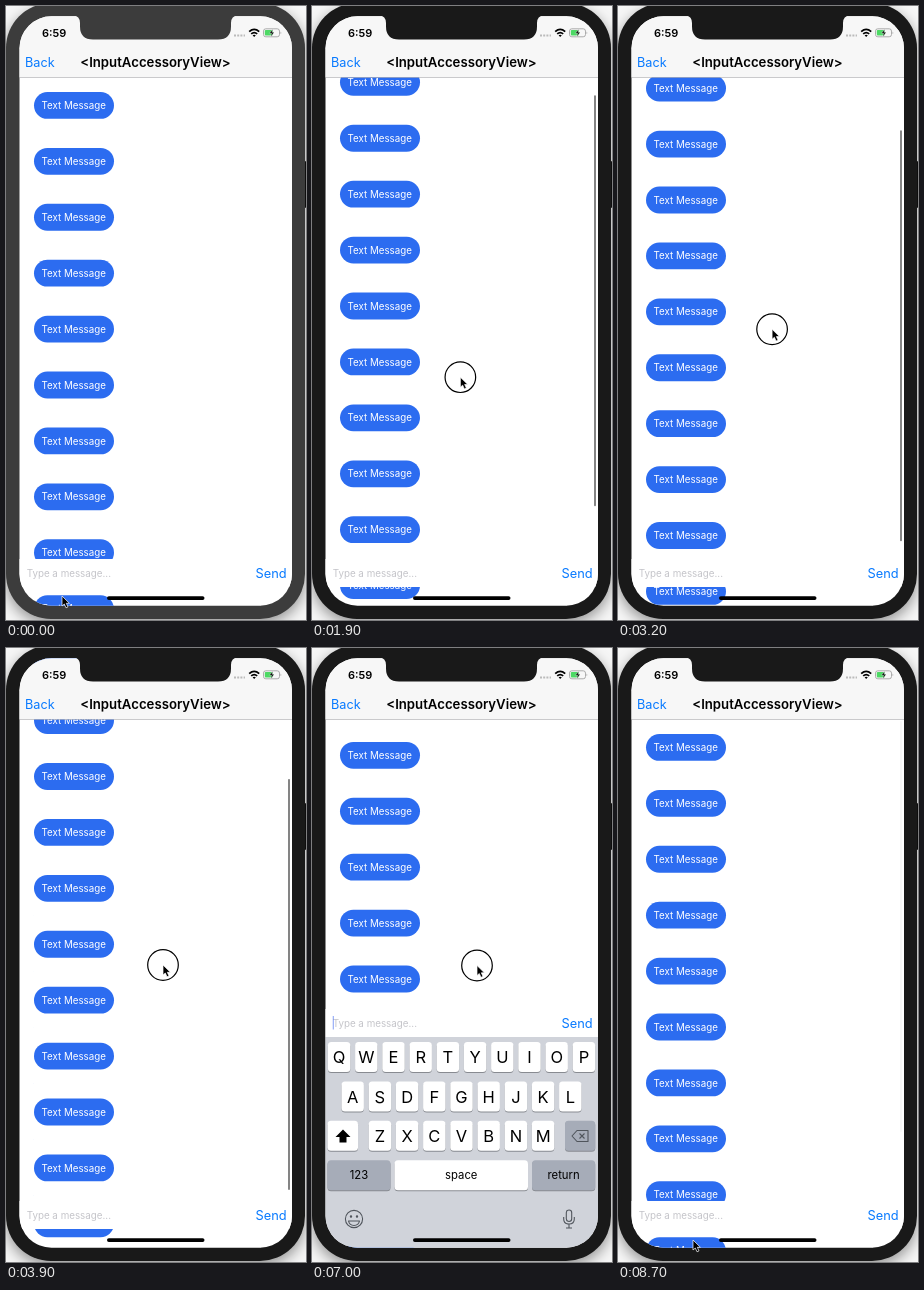
An HTML page for the animation above (8.8 s loop, 300 by 614 pixels).

```html
<!DOCTYPE html>
<html lang="en">
<head>
<meta charset="utf-8">
<title>Chat input demo</title>
<style>
  html, body { margin: 0; width: 100%; height: 100%; overflow: hidden; background: #f6f6f6; }
  svg { display: block; width: 300px; height: 614px; font-family: Inter, Roboto, sans-serif; }
  #body { filter: drop-shadow(0 5px 7px rgba(0, 0, 0, .4)); }
  .mid { text-anchor: middle; }
  .blue { fill: #087aff; }
  .line { fill: none; stroke: #50555c; stroke-width: 1.1; stroke-linejoin: round; }
</style>
</head>
<body>
<svg viewBox="0 0 300 614">
  <defs>
    <clipPath id="screen"><rect x="13.5" y="10.3" width="272.5" height="589.5" rx="32"/></clipPath>
  </defs>
  <rect x="297" y="155" width="3" height="47" rx="1" fill="#111"/>
  <rect id="body" x="0" y="-3" width="299" height="616" rx="45"/>
  <g clip-path="url(#screen)">
    <rect x="13" y="10" width="274" height="591" fill="#fff"/>
    <g id="list"></g>
    <rect id="thumb" x="282.1" width="1.8" rx=".9" fill="#777"/>

    <rect x="13" y="10" width="274" height="61" fill="#f7f7f7"/>
    <rect x="13" y="71" width="274" height=".7" fill="#b4b4b6"/>
    <text x="36" y="31" font-size="11" font-weight="600">6:59</text>
    <text x="19" y="60.7" font-size="12.7" class="blue">Back</text>
    <text x="149.5" y="60.7" font-size="13.2" font-weight="600" class="mid">&lt;InputAccessoryView&gt;</text>
    <path d="M228 29.5h11" stroke="#bbb" stroke-width="2" stroke-dasharray="2 1.2"/>
    <path d="M243.2 25.6q5-4.4 10 0M245.2 27.9q3-2.6 6 0" fill="none" stroke="#000" stroke-width="1.8"/>
    <path d="M246.6 29.3q1.6-1.3 3.2 0l-1.6 1.8z"/>
    <rect x="257.5" y="22.8" width="16" height="8" rx="2.3" fill="none" stroke="#999" stroke-width=".8"/>
    <rect x="258.8" y="24.1" width="8" height="5.4" rx="1" fill="#4cd964"/>
    <path d="M274.6 25.4q1.5 1.4 0 2.8z" fill="#999"/>
    <path d="M266.8 22.9l-3.4 4.4h2.2l-1 3.6 3.6-4.7h-2.2z" stroke="#f7f7f7" stroke-width=".4"/>

    <g id="bar">
      <rect x="13" y="553" width="274" height="28" fill="#fff"/>
      <text x="20.7" y="570.6" font-size="9.8" fill="#c5c5ca">Type a message...</text>
      <text x="249.5" y="571.7" font-size="12.8" class="blue">Send</text>
      <rect id="caret" x="20.7" y="560" width="1.3" height="13.5" fill="#426bf2"/>
    </g>
    <g id="keys"></g>
    <rect x="101" y="590.2" width="97.5" height="3.7" rx="1.85"/>
  </g>
  <path id="notch" d="M67 9q7 1 7 8v3.500q0 13 13 13h125q13 0 13-13v-3.500q0-7 7-8z"/>
  <g id="mouse">
    <circle id="ring" r="15.3" fill="none" stroke="#000" stroke-width="1.2"/>
    <path d="M0 0v10l2.3-2 1.7 3.8 2-.9-1.700-3.600h3.100z" stroke="#fff" stroke-width=".7"/>
  </g>
</svg>
<script>
const $ = id => document.getElementById(id);
const set = (id, attrs) => {
  for (const k in attrs) $(id).setAttribute(k, attrs[k]);
};
const label = (x, y, size, text, fill = '#000') =>
  `<text x="${x}" y="${y}" font-size="${size}" fill="${fill}" class="mid">${text}</text>`;

// Message list
let html = '';
for (let i = 0; i < 15; i++) {
  const y = 99.4 + i * 55.92;
  html += `<rect x="28" y="${y - 13.4}" width="80" height="26.8" rx="13.4" fill="#2c6cf0"/>`
    + label(67.7, y + 3.6, 9.75, 'Text Message', '#fff');
}
$('list').innerHTML = html;

// Keyboard, laid out at its raised position
const GREY = '#a6acb8', PITCH = 27.2;
const rowY = r => 394 + r * 39.4;
function key(x, row, w, text = '', size = 11.3, fill = '#fff') {
  const y = rowY(row);
  const box = (dy, color) =>
    `<rect x="${x}" y="${y + dy}" width="${w}" height="30" rx="3.5" fill="${color}"/>`;
  return box(1, '#888b91') + box(0, fill) + label(x + w / 2, y + 15 + size * 0.37, size, text);
}

html = '<rect x="13" y="389" width="274" height="226" fill="#d0d3da"/>';
['QWERTYUIOP', 'ASDFGHJKL', 'ZXCVBNM'].forEach((row, r) => {
  const x0 = 149.5 - row.length * PITCH / 2 + 2.4;
  [...row].forEach((ch, i) => html += key(x0 + i * PITCH, r, 22.4, ch, 16.5));
});
html += key(15.5, 2, 30.5) + key(253, 2, 30.2, '', 0, GREY)
  + key(15.5, 3, 63, '123', 11.3, GREY) + key(82.5, 3, 133.5, 'space') + key(220, 3, 63.2, 'return', 11.3, GREY)
  + `<path d="M31 481.5l7.5 7.5h-4v5.5h-7v-5.5h-4z"/>
  <path class="line" d="M260 488l5-5.5h11v11h-11zM267.5 485.5l5 5m0-5l-5 5"/>
  <circle class="line" cx="42" cy="571" r="8.6"/>
  <path class="line" d="M36.5 573h11q-1 4.5-5.5 4.5t-5.5-4.5z"/>
  <path d="M39 568.5h0m6 0h0" stroke="#50555c" stroke-width="2.4" stroke-linecap="round"/>
  <rect class="line" x="254.3" y="562" width="5.4" height="11.5" rx="2.7"/>
  <path class="line" d="M251.7 569v2q0 5 5.3 5t5.3-5v-2M257 576v4m-3 0h6"/>`;
$('keys').innerHTML = html;

// Pointer path: time, x, y
const path = [
  [0, 56, 590], [1200, 147, 398], [1400, 147, 398],                    // approach the list
  [2500, 150, 339], [3700, 157, 312], [3900, 157, 317], [4500, 155, 350], // drag up, then back
  [5200, 74.5, 577], [5500, 82, 567], [5800, 82, 567],                 // tap the field
  [6700, 165, 318], [7000, 165, 317.5], [8000, 158, 520], [8700, 75, 592] // pull the keyboard down
];
function pointer(t) {
  const i = Math.max(1, path.findIndex(p => p[0] >= t));
  const [t0, x0, y0] = path[i - 1], [t1, x1, y1] = path[i];
  const p = Math.max(0, (t - t0) / (t1 - t0));
  return { x: x0 + (x1 - x0) * p, y: y0 + (y1 - y0) * p };
}

const within = (t, a, b) => t >= a && t < b;
function ramp(t, a, b) {
  const p = Math.min(1, Math.max(0, (t - a) / (b - a)));
  return p * p * (3 - 2 * p);
}

// The list trails the finger slightly, and resists being pulled past its top
function scrollAt(t) {
  if (t < 7000) return 398 - pointer(Math.min(4500, Math.max(1400, t - 70))).y;
  const s = 48 - (pointer(Math.min(t, 8000)).y - 317.5);
  return s > 0 ? s : s * 0.08 * (1 - ramp(t, 8000, 8400));
}

// The keyboard slides in after the tap, then is pushed down by the finger
function keyTop(t) {
  if (t < 6800) return 614 - 225 * ramp(t, 5800, 6300);
  return Math.min(614, Math.max(389, pointer(t).y + 28) + 70 * ramp(t, 8000, 8300));
}

function draw(now) {
  const t = Math.floor(now % 8800 / 100) * 100; // 10 steps per second
  const { x, y } = pointer(t);
  const s = scrollAt(t), top = keyTop(t);
  const lift = Math.max(0, 581 - top);
  const shell = t < 1400 ? '#3c3c3c' : '#191919';
  const pressed = within(t, 1300, 4500) || within(t, 5500, 5600) || within(t, 6800, 8100);

  set('body', { fill: shell });
  set('notch', { fill: shell });
  set('list', { transform: `translate(0 ${-s})` });
  set('thumb', {
    y: 73 + Math.max(0, s) * 0.7,
    height: 411 - lift * 0.85 + Math.min(0, s),
    opacity: ramp(t, 1400, 1500) - ramp(t, 4500, 4900) + ramp(t, 7000, 7100) - ramp(t, 8400, 8750)
  });
  set('bar', { transform: `translate(0 ${-lift})` });
  set('keys', { transform: `translate(0 ${top - 389})` });
  set('caret', { opacity: within(t, 5900, 8200) ? 0.5 + 0.5 * Math.sin((t - 7000) * Math.PI / 500) : 0 });
  set('mouse', { transform: `translate(${x} ${y})` });
  set('ring', { opacity: pressed ? 1 : 0 });
}

let start;
function tick(now) {
  start ??= now;
  draw(now - start);
  requestAnimationFrame(tick);
}
draw(0);
requestAnimationFrame(tick);
</script>
</body>
</html>
```
